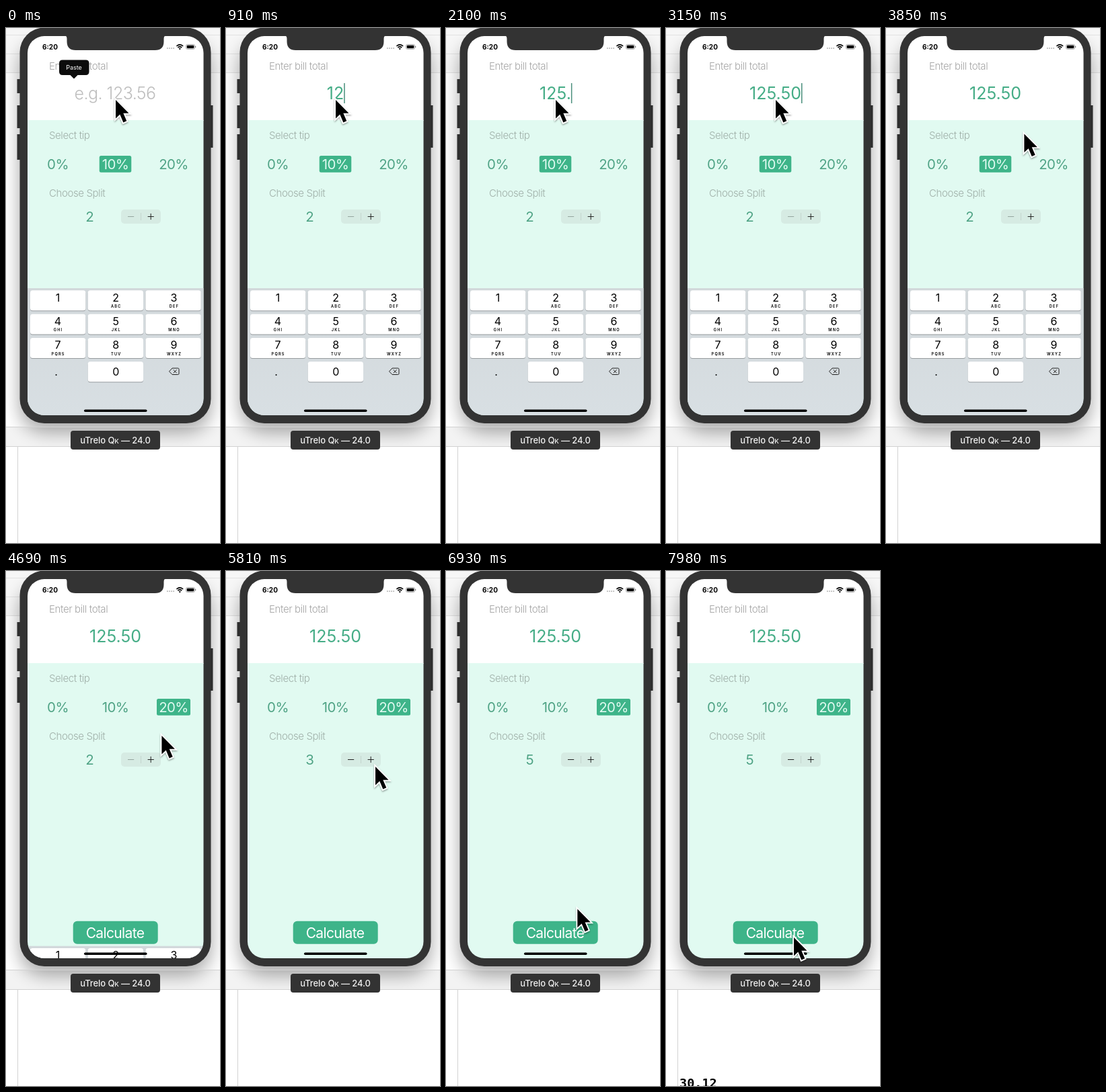
Write an HTML page that moves like this. It is 318x766 px and loops after 8 s.

```html
<!DOCTYPE html>
<html lang="en">
<head>
<meta charset="utf-8">
<title>Tip calculator</title>
<style>
  html, body { margin: 0; width: 100%; height: 100%; overflow: hidden; background: #fff; }
  svg { display: block; width: 100%; height: 100%; }
  text { font-family: Inter, "Open Sans", sans-serif; white-space: pre; }
  .label { font-size: 15px; font-weight: 300; letter-spacing: -.4px; }
  .mid { text-anchor: middle; }
  .hint { font-size: 25px; font-weight: 300; letter-spacing: -.02em; }
  .amount { font-size: 25px; }
  .tip { font-size: 20.5px; letter-spacing: -.03em; }
  .digit { font-size: 16px; }
  .letters { font-size: 5.6px; font-weight: 600; letter-spacing: 1.2px; }
  .result { font: bold 18.5px "DejaVu Sans Mono", monospace; }
</style>
</head>
<body>
<svg viewBox="0 0 318 766" preserveAspectRatio="none">
  <defs>
    <clipPath id="screen"><rect x="32" y="12" width="261.5" height="564" rx="25"/></clipPath>
    <filter id="blur" x="-30%" y="-20%" width="160%" height="140%"><feGaussianBlur stdDeviation="13"/></filter>
    <filter id="drop" x="-50%" y="-50%" width="200%" height="200%">
      <feDropShadow dx="0" dy="1.5" stdDeviation="1.3" flood-opacity=".4"/>
    </filter>
    <linearGradient id="board" x2="0" y2="1">
      <stop offset="0" stop-color="#d2d8db"/><stop offset="1" stop-color="#d8dfe3"/>
    </linearGradient>
  </defs>

  <!-- Window behind the device -->
  <rect width="318" height="766" fill="#fff"/>
  <rect width="318" height="66" fill="#f6f6f6"/>
  <rect y="594" width="318" height="28" fill="#f3f3f3"/>
  <path d="M0 10.5H318M0 38.5H318M0 66.5H318" stroke="#e2e2e2"/>
  <rect x="19" y="20" width="287" height="582" rx="40" opacity=".32" filter="url(#blur)"/>
  <rect y="623" width="318" height="143" fill="#fff"/>
  <path d="M0 593.5H318M0 622.5H318M17.5 623V766" stroke="#d2d2d2"/>
  <text id="result" class="result" x="20" y="768">30.12</text>

  <!-- Device -->
  <path d="M16.5 76h5v21h-5zM16.5 115h5v34h-5zM16.5 158h5v38h-5zM303 115h4.5v63h-4.5z" fill="#2f2f2f"/>
  <rect x="20.5" y="-.5" width="284" height="588.5" rx="36.500" fill="#333"/>

  <g clip-path="url(#screen)">
    <rect x="32" y="12" width="262" height="126" fill="#fff"/>
    <rect x="32" y="137" width="262" height="440" fill="#e1faf1"/>
    <path d="M86 11q4.500 0 4.500 5v4q0 13 13 13h118q13 0 13-13v-4q0-5 4.500-5z" fill="#333"/>

    <text x="54" y="32" font-size="10" font-weight="700">6:20</text>
    <path d="M239 30.2h11" stroke="#b5b5b5" stroke-width="1.7" stroke-dasharray="1.7 1.4"/>
    <path d="M253.4 27q4.9-4.2 9.8 0M255.3 29.1q3-2.5 6 0" fill="none" stroke="#000" stroke-width="1.6"/>
    <path d="M256.6 30.6q1.7-1.2 3.4 0l-1.7 1.8z"/>
    <rect x="267.5" y="24.5" width="13" height="7" rx="2" fill="none" stroke="#999" stroke-width=".8"/>
    <rect x="268.7" y="25.7" width="10.6" height="4.6" rx="1"/>
    <path d="M281.7 26.8v2.4" stroke="#777"/>

    <text class="label" x="64" y="62" fill="#a5a5a5">Enter bill total</text>
    <text id="hint" class="hint mid" x="162" y="106" fill="#bdbdbd">e.g. 123.56</text>
    <text id="amount" class="amount mid" x="162.5" y="106" fill="#46ad87"></text>
    <rect id="caret" y="82" width="1.5" height="30" fill="#4a8f7c"/>

    <text class="label" x="64" y="165" fill="#9fafa8">Select tip</text>
    <g id="tips"></g>

    <text class="label" x="64" y="251" fill="#9fafa8">Choose Split</text>
    <text id="split" class="tip mid" x="124.3" y="287.7" fill="#4fa385"></text>
    <rect x="171" y="270" width="59" height="21" rx="5" fill="#d6ebe3"/>
    <path id="press" d="M201 270h24q5 0 5 5v11q0 5-5 5h-24z" fill="#bed3cb"/>
    <path d="M200.5 275v11" stroke="#bfd0c9" stroke-width=".8"/>
    <path id="minus" d="M181 280.5h9.2"/>
    <path d="M210.6 280.5h9.2M215.2 275.9v9.2" stroke="#222"/>

    <rect x="99.700" y="520.700" width="126" height="34" rx="6" fill="#3eb489"/>
    <text id="calc" class="tip mid" x="162" y="545.5" fill="#fff" style="font-size:21px">Calculate</text>

    <g id="keys"><rect x="32" y="387" width="262" height="192" fill="url(#board)"/></g>
    <rect x="116" y="567.6" width="93.5" height="3.4" rx="1.7"/>
  </g>

  <g id="paste">
    <path d="M84 47.5h34.500q5 0 5 5v12.500q0 5-5 5h-12l-5.500 5.500-5.500-5.500h-11.500q-5 0-5-5v-12.500q0-5 5-5z" fill="#0c0c0c"/>
    <text class="mid" x="101" y="62" font-size="9" fill="#fff">Paste</text>
  </g>

  <rect x="96" y="599" width="133" height="28" rx="4" fill="#333"/>
  <text class="mid" x="162.500" y="617.500" font-size="13" font-weight="500" letter-spacing="-.1" fill="#f2f2f2">uTrelo Q<tspan font-size="9.500">K</tspan> — 24.0</text>

  <g id="cursor" filter="url(#drop)">
    <path d="M0 0V27.500L6.300 21.600L11.300 33.500L16.300 31.300L11.300 19.700H19.500Z" stroke="#fff" stroke-width="3.600" paint-order="stroke"/>
  </g>
</svg>
<script>
const $ = id => document.getElementById(id);
const LOOP = 8000, STEP = 70;
const PICK = 4390;

function add(parent, tag, attrs, text = '') {
  const el = document.createElementNS('http://www.w3.org/2000/svg', tag);
  for (const k in attrs) el.setAttribute(k, attrs[k]);
  el.textContent = text;
  parent.appendChild(el);
  return el;
}

// Keypad
const pad = ['1', '2ABC', '3DEF', '4GHI', '5JKL', '6MNO', '7PQRS', '8TUV', '9WXYZ', '.', '0', ''];
pad.forEach((key, i) => {
  const col = i % 3, x = 36 + col * 85.7, y = 390.3 + Math.floor(i / 3) * 35.3, mid = 77 + col * 86.2;
  if (i < 9 || i === 10) {
    add($('keys'), 'rect', { x, y: y + 1, width: 82.3, height: 30, rx: 3.5, fill: '#969b9e' });
    add($('keys'), 'rect', { x, y, width: 82.3, height: 30, rx: 3.5, fill: '#fff' });
  }
  const low = i > 8 ? 4 : 0;
  add($('keys'), 'text', { x: mid - (i === 9 ? 2.5 : 0), y: y + 16.4 + low, class: 'digit mid' }, key.slice(0, 1));
  add($('keys'), 'text', { x: mid + .6, y: y + 25.7, class: 'letters mid' }, key.slice(1));
});
add($('keys'), 'path', {
  d: 'M247 506h8.5q1.5 0 1.5 1.5v6.5q0 1.5-1.5 1.5h-8.5l-4.5-4.75zM248.8 508.4l4.8 4.8m0-4.8l-4.8 4.8',
  fill: 'none', stroke: '#222', 'stroke-width': 1
});

// Tip choices
const tips = [['0%', 77], ['10%', 162.5], ['20%', 249]].map(([name, x], i) => {
  const w = i === 1 ? 47.5 : 50;
  return {
    box: add($('tips'), 'rect', { x: x - w / 2, y: 190, width: w, height: 24.7, rx: 2.5, fill: '#3eb489' }),
    label: add($('tips'), 'text', { x, y: 209.7, class: 'tip mid' }, name)
  };
});

const typed = [[560, '1'], [840, '12'], [1190, '125'], [1540, '125.'], [2240, '125.5'], [2870, '125.50']];
const taps = [5390, 5880, 6160];
const moves = [
  [3490, 4200, 246, 206],
  [4410, 4980, 216, 286],
  [4980, 5110, 222, 291],
  [6500, 7080, 190, 545]
];

const clamp = v => Math.max(0, Math.min(1, v));
const part = (t, a, b) => clamp((t - a) / (b - a));
const smooth = p => p * p * (3 - 2 * p);
const show = (id, on) => $(id).setAttribute('opacity', +on);

function cursorAt(t) {
  let x = 163, y = 107;
  for (const [a, b, tx, ty] of moves) {
    const p = smooth(part(t, a, b));
    x += (tx - x) * p;
    y += (ty - y) * p;
  }
  return [x, y];
}

function draw(t) {
  show('paste', 1 - part(t, 70, 350));

  const [since, text] = typed.filter(k => k[0] <= t).pop() || [0, ''];
  $('amount').textContent = text;
  show('hint', !text);
  const blink = (t - since) % 1050;
  show('caret', text && t < PICK ? 1 - part(blink, 580, 720) + part(blink, 980, 1050) : 0);
  $('caret').setAttribute('x', 162.5 + (text ? $('amount').getComputedTextLength() / 2 : 0));

  const chosen = t < PICK ? 1 : 2;
  tips.forEach(({ box, label }, i) => {
    box.setAttribute('opacity', +(i === chosen));
    label.setAttribute('fill', i === chosen ? '#e1faf1' : '#4fa385');
  });

  const hide = 1 - (1 - part(t, PICK, PICK + 440)) ** 2;
  $('keys').setAttribute('transform', `translate(0 ${hide * 190})`);

  const people = 2 + taps.filter(a => a <= t).length;
  $('split').textContent = people;
  $('minus').setAttribute('stroke', people > 2 ? '#222' : '#94a59e');
  show('press', taps.some(a => t >= a && t < a + 110));

  show('calc', t >= 7350 && t < 7500 ? .4 : 1);
  show('result', t >= 7500);
  $('cursor').setAttribute('transform', `translate(${cursorAt(t)})`);
}

function tick(now) {
  const t = now % LOOP;
  draw(Math.floor(t / STEP) * STEP);
  requestAnimationFrame(tick);
}
draw(0);
requestAnimationFrame(tick);
</script>
</body>
</html>
```
